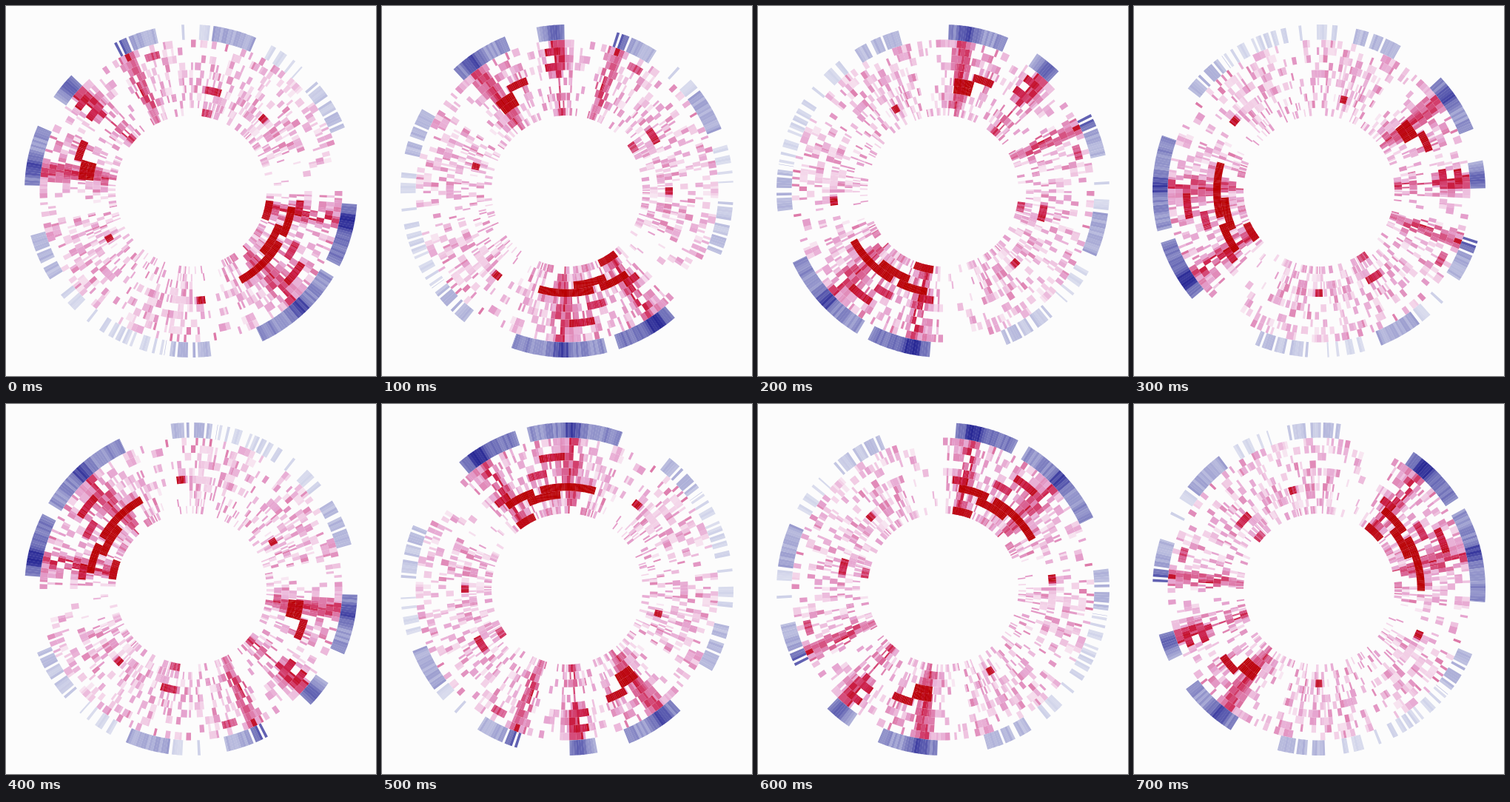
An HTML page with a canvas that plays this animation: 500x500 px, repeating every 800 ms.

```html
<!DOCTYPE html>
<html lang="en">
<head>
<meta charset="utf-8">
<title>Turning ring heatmap</title>
<style>
html, body { margin: 0; width: 100%; height: 100%; overflow: hidden; background: #fcfcfc; }
canvas { display: block; width: 500px; height: 500px; }
</style>
</head>
<body>
<canvas id="stage" width="500" height="500"></canvas>
<script>
const ctx = document.getElementById('stage').getContext('2d');
const STEPS = 8, HOLD = 100;
const INNER = 102, STEP = 10.25, RINGS = 10, OUTER = 225;
const RAD = Math.PI / 180;
const COLUMN = .9;

// Busy sectors: start, end, outer level and, where there is one, the peak
const SECTORS = [
  { from: 4.6, to: 26.8, level: .56, peak: 11 },
  { from: 31, to: 64.5, level: .48, peak: 46.5 },
  { from: 83, to: 99.3, level: .3 },
  { from: 100, to: 145, level: .19 },
  { from: 147, to: 164.4, level: .3 },
  { from: 182, to: 203, level: .46, peak: 188 },
  { from: 214.4, to: 224, level: .36, peak: 220 },
  { from: 242.5, to: 257.5, level: .33, peak: 244 },
  { from: 264, to: 277, level: .2 },
  { from: 277.8, to: 293, level: .37 },
  { from: 298, to: 312, level: .17 },
  { from: 318, to: 337.5, level: .27 }
];

// Hot arcs: ring, start, end, level
const ARCS = [
  [0, 7, 21, .95], [3, 9, 26, .98], [2, 21, 41, .98], [3, 30, 61, .98],
  [4, 5, 13, .88], [5, 26, 35, .75], [7, 33, 44, .86],
  [3, 186, 196, .96], [4, 186, 196, .96], [5, 195, 205, .92],
  [6, 215, 224, .76], [8, 216, 224, .8],
  [3, 278, 287, .8], [0, 278, 285, .7], [8, 251, 257, .65],
  [4, 82.5, 87, .84], [2, 148, 152, .86], [3, 313, 317, .84]
];

const REDS = [[252, 252, 252], [244, 213, 233], [229, 163, 207], [217, 98, 147], [204, 32, 74], [184, 0, 0]];
const BLUES = [[252, 252, 252], [210, 213, 234], [163, 165, 211], [118, 119, 188], [72, 72, 166], [31, 31, 144]];

let seed = 4127;
function rand() {
  seed = (seed * 1664525 + 1013904223) >>> 0;
  return seed / 4294967296;
}

const clamp = (x, lo, hi) => Math.max(lo, Math.min(hi, x));
const wobble = size => (rand() - .5) * size;
const bump = (a, peak, width) => peak ? Math.exp(-(((a - peak) / width) ** 2)) : 0;

function shade(ramp, level) {
  const x = clamp(level, 0, .999) * (ramp.length - 1);
  const i = Math.floor(x);
  return `rgb(${ramp[i].map((c, n) => Math.round(c + (ramp[i + 1][n] - c) * (x - i)))})`;
}

const cells = [];
function addCell(r0, r1, a0, a1, color) {
  cells.push({ r0, r1, a0: a0 * RAD, a1: (a1 + .06) * RAD, color });
}

function addRing(ring, a0, a1, level) {
  const r = INNER + ring * STEP;
  addCell(r, r + STEP, a0, a1, shade(REDS, level));
}

function strips(a0, a1, draw) {
  for (let a = a0; a < a1 - .01; a += COLUMN) draw(a, Math.min(a + COLUMN, a1));
}

// Scattered cells, denser and redder in busy sectors and around peaks
function scatter() {
  const columns = Math.round(360 / COLUMN);
  const lean = Array.from({ length: columns }, () => .4 + 1.2 * rand());
  for (let ring = 0; ring < RINGS; ring++) {
    for (let i = 0; i < columns;) {
      const span = 1 + Math.floor(rand() * 2.2);
      const a = i * COLUMN;
      const { level = 0, peak } = SECTORS.find(s => a > s.from - 3 && a < s.to + 3) || {};
      const heat = bump(a, peak, 3);
      const odds = (level ? .36 + level * .3 : .17) * lean[i] + heat * .4;
      if (rand() < odds) {
        addRing(ring, a, a + span * COLUMN, .1 + .36 * rand() + level * .3 * rand() + heat * .36);
      }
      i += span;
    }
  }
}

function arcs() {
  for (const [ring, from, to, level] of ARCS) {
    strips(from, to, (a, b) => addRing(ring, a, b, level + wobble(level > .9 ? .06 : .2)));
  }
}

// Weak sectors of the outer band break up into loose strips
function band() {
  for (const { from, to, level, peak } of SECTORS) {
    strips(from, to, (a, b) => {
      if (rand() > (level - .1) * 3.8) return;
      const tone = level * (1 + wobble(.4)) + bump(a, peak, 3.5) * .36;
      addCell(INNER + RINGS * STEP, OUTER, a, b, shade(BLUES, tone));
    });
  }
}

function paint(turn) {
  ctx.setTransform(1, 0, 0, 1, 0, 0);
  ctx.fillStyle = '#fcfcfc';
  ctx.fillRect(0, 0, 500, 500);
  ctx.translate(250, 250);
  ctx.rotate(turn * RAD);
  for (const { r0, r1, a0, a1, color } of cells) {
    ctx.beginPath();
    ctx.arc(0, 0, r1, a0, a1);
    ctx.arc(0, 0, r0, a1, a0, true);
    ctx.closePath();
    ctx.fillStyle = color;
    ctx.fill();
  }
}

scatter();
arcs();
band();

const start = performance.now();
let shown = -1;
function tick() {
  const step = Math.floor((performance.now() - start) / HOLD) % STEPS;
  if (step !== shown) {
    shown = step;
    paint(Math.min(step * 45, 300)); // the last step is a shorter turn
  }
  requestAnimationFrame(tick);
}
tick();
</script>
</body>
</html>
```
